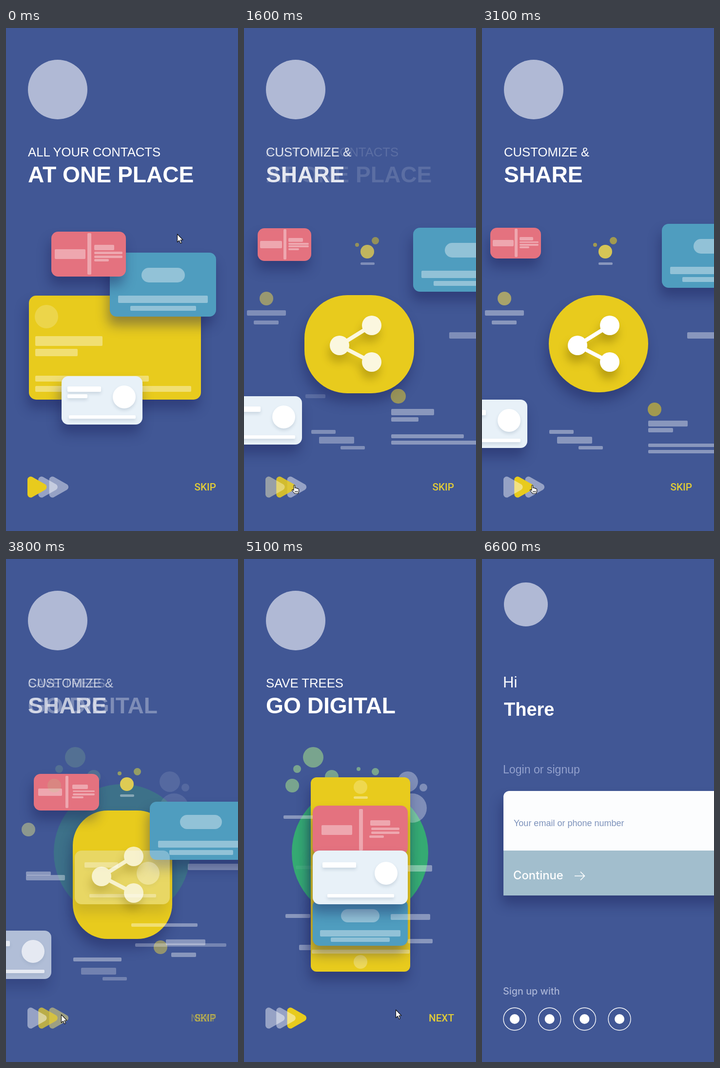
Write an HTML page that moves like this. It is 476x1030 px and loops after 6700 ms.

```html
<!DOCTYPE html>
<html lang="en">
<head>
<meta charset="utf-8">
<title>Onboarding</title>
<style>
  html, body { margin: 0; width: 100%; height: 100%; overflow: hidden; background: #415795; }
  body { position: relative; }
  body > * { position: absolute; }
  svg { left: 0; top: 0; width: 476px; height: 1030px; overflow: hidden; }
  text { font-family: "Liberation Sans", Arial, sans-serif; fill: #fff; }
  .lead { font-size: 25.7px; }
  .head { font-size: 46.2px; font-weight: 700; }
  .link { font: 500 20.7px Roboto, sans-serif; fill: #e3cd36; text-anchor: end; }
  .inter { font-family: Inter, sans-serif; font-weight: 500; }
  .dim { fill: #93a1cd; }
</style>
</head>
<body>
<script>
const LOOP = 6700, MOVE = 600;
const STARTS = [1157, 3564, 5920];
const SCENES = [0, 1, 2, 3];
const timing = { duration: LOOP, iterations: Infinity };

const veil = a => `rgba(255,255,255,${a})`;
const YELLOW = '#e8cb1d', RED = '#e4727f', BLUE = '#4f9dbf', PALE = '#e8f1f8';
const BAR = veil(.38), MOSS = 'rgba(232,203,29,.58)', GREEN = 'rgba(166,224,138,.56)';
const SHADOW = '-4px 18px 24px rgba(22,28,82,.4)';
const SOFT = '0 4px 6px rgba(70,100,130,.18)';

// Four scene poses become holds joined by eased moves.
function play(el, poses) {
  const frames = [{ ...poses[0], offset: 0 }];
  STARTS.forEach((start, i) => frames.push(
    { ...poses[i], offset: start / LOOP, easing: 'ease-in-out' },
    { ...poses[i + 1], offset: (start + MOVE) / LOOP }));
  frames.push({ ...poses[3], offset: 1 });
  el.animate(frames, timing);
}

const perScene = (value, i) => Array.isArray(value) ? value[Math.min(i, value.length - 1)] : value;

// A scene without a rectangle borrows the nearest one and fades out.
function box(color, rects, radius = 2, shadow = 'none') {
  const el = document.body.appendChild(document.createElement('div'));
  el.style.boxShadow = shadow;
  let last = rects.find(Boolean);
  play(el, SCENES.map(i => {
    last = rects[i] || last;
    const [left, top, width, height] = last.map(v => v + 'px');
    return {
      left, top, width, height, opacity: rects[i] ? 1 : 0,
      borderRadius: perScene(radius, i) + 'px', backgroundColor: perScene(color, i)
    };
  }));
}
const disc = (x, y, r) => [x - r, y - r, 2 * r, 2 * r];
const dot = (color, discs) => box(color, discs.map(d => d && disc(...d)), 200);

// Parts are [dx, dy, w, h] around the card centre; they spread with the card but never grow.
function card(color, [baseW, baseH], rects, parts, partColor, partShadow) {
  box(color, rects, 14, SHADOW);
  for (const [dx, dy, w, h] of parts) {
    const round = Math.min(w, h) > 25;
    box(partColor, rects.map(([x, y, cardW, cardH]) => {
      const kx = cardW / baseW, ky = cardH / baseH, size = Math.min(1, kx);
      return [x + cardW / 2 + dx * kx - w * size / 2, y + cardH / 2 + dy * ky - h * size / 2, w * size, h * size];
    }), round ? 24 : 2, partShadow);
  }
}

function layer(markup, opacities) {
  document.body.insertAdjacentHTML('beforeend', `<svg viewBox="0 0 476 1030">${markup}</svg>`);
  const el = document.body.lastElementChild;
  if (opacities) play(el, opacities.map(opacity => ({ opacity })));
  return el;
}
const shownIn = scene => SCENES.map(i => +(i === scene));

// Brand spot
dot('#b0b9d5', [...Array(3).fill([106, 126, 61]), [89.5, 93, 45]]);

// Scenery behind the phone
dot('#35aa73', [, , [238, 601, 140]]);
for (const d of [[142, 406, 21], [109, 430, 8], [180, 446, 14]]) dot(GREEN, [, , d]);
for (const d of [[336, 456, 21], [368, 468, 8], [345, 510, 30]]) dot(veil(.33), [, , d]);
dot([MOSS, MOSS, GREEN], [, [269, 435, 7.5], [269, 435, 7.5]]);
dot([MOSS, MOSS, GREEN], [, [232, 444, 4], [235, 430, 4]]);

// Loose bars keep their size while they drift
const drift = (w, h, from, to) => box(BAR, [, [...from, w, h], to && [...to, w, h]]);
drift(80, 11, [6, 578], [113, 790]);
drift(51, 8, [20, 599], [85, 727]);
drift(72, 14, [154, 837]);
drift(50, 7, [198, 856]);

// Large card, share button, phone body
box(YELLOW, [[47, 548, 353, 213], [137, 547, 204, 199], [137, 447, 204, 398]], [15, 100, 12], SHADOW);

// Its contents shrink into a cluster, then scatter at that size
const SHRINK = .585;
function scatter(color, [x, y, w, h], to, radius) {
  const small = [w * SHRINK, h * SHRINK];
  box(color, [[x, y, w, h], [341 + (x - 60) * SHRINK, 804 + (y - 631) * SHRINK, ...small], [...to, ...small]], radius);
}
scatter([veil(.2), MOSS, veil(.28)], disc(83, 591, 24), [225, 811], 24);
scatter(BAR, [60, 657, 87, 15], [336, 778]);
scatter(BAR, [60, 712, 233, 12], [81, 525]);
scatter([BAR, BAR, veil(.06)], [60, 733, 320, 12], [106, 628]);

drift(112, 13, [421, 623], [274, 627]);
box(BAR, [, [138, 823, 50, 8], [139, 800, 201, 8]]);
dot(['#d6c556', '#d6c556', '#efd84f'], [, [253, 458, 14], [239, 467, 14]]);
drift(29, 5, [239, 480], [225, 486]);

card(BLUE, [218, 131], [[213, 460, 218, 131], [369, 401, 218, 131], [141, 697, 195, 95]],
  [[0, -19.5, 89, 30], [0, 30, 184, 15], [0, 48.5, 135, 10]], BAR);
scatter(BAR, [60, 631, 138, 20], [301, 727]);

const textRows = [58, 58, 30].map((w, i) => [11.5 + w / 2, -2.5 + 7.5 * i, w, 5]);
card(RED, [153, 92], [[93, 417, 153, 92], [17, 409, 104, 63], [141, 505, 195, 100]],
  [[-38, 0, 63, 20], [1.5, -.5, 8, 85], [32, -13.5, 41, 11], ...textRows], BAR);
dot(GREEN, [, , [99, 464, 14]]);
box(['#a8a36b', '#a8a36b', '#c4e4d0'], [, disc(46, 554, 14)], 40);

// White cards
const idParts = [[-36.5, -23, 69, 11], [45, -7.5, 47, 47], [.5, 34, 137, 7]];
card(PALE, [166, 99], [[114, 713, 166, 99], [-73, 761, 166, 99]], idParts, '#fff', SOFT);
box('#fff', [[126, 750, 41, 8]], 2, SOFT);
card(PALE, [166, 99], [, , [141, 597, 195, 110]], idParts, '#fff', SOFT);

// Share symbol
const nodes = [[262, 609], [196, 650], [262, 684]];
layer(`<g fill="#fff" style="filter:drop-shadow(-3px 15px 9px rgba(110,90,0,.4))">
  <polyline points="${nodes}" fill="none" stroke="#fff" stroke-width="8"/>
  ${nodes.map(([x, y]) => `<circle cx="${x}" cy="${y}" r="20"/>`).join('')}</g>`, shownIn(1));

// Titles
[['ALL YOUR CONTACTS', 'AT ONE PLACE'], ['CUSTOMIZE &amp;', 'SHARE'], ['SAVE TREES', 'GO DIGITAL']]
  .forEach(([lead, head], scene) => layer(
    `<text x="45" y="263" class="lead">${lead}</text><text x="45" y="316" class="head">${head}</text>`,
    shownIn(scene)));

// Page indicator
const wedge = (i, color, opacity) => `<path d="M6.500 7V37L33 22Z" transform="translate(${44 + 22.3 * i} 918)"
  fill="${color}" stroke="${color}" stroke-width="13" stroke-linejoin="round" opacity="${opacity}"/>`;
for (const i of [2, 1, 0]) {
  layer(wedge(i, '#fff', .45), SCENES.map(scene => +(scene < 3 && scene !== i)));
  layer(wedge(i, YELLOW, 1), shownIn(i));
}
const link = label => `<text x="431" y="947" class="link">${label}</text>`;
layer(link('SKIP'), [1, 1, 0, 0]);
layer(link('NEXT'), shownIn(2));

// Login
box('#fcfdfe', [, , , [44, 475, 460, 214]], 12, SHADOW);
box('#a2becd', [, , , [44, 597, 460, 92]], 0);
const buttons = SCENES.map(i => {
  const at = `cx="${67 + 71.7 * i}" cy="942"`;
  return `<circle ${at} r="23" fill="none" stroke="#fff" stroke-width="1.4"/><circle ${at} r="10" fill="#fff"/>`;
}).join('');
layer(`<text x="43" y="263" font-size="31">Hi</text>
  <text x="45" y="321" font-size="38" font-weight="700">There</text>
  <text x="43" y="439" font-size="23.1" class="dim">Login or signup</text>
  <text x="65" y="547" font-size="18" style="fill:#7d92bb">Your email or phone number</text>
  <text x="64" y="656" font-size="23.8" class="inter">Continue</text>
  <path d="M190 649H210M202 640.500L210.500 649L202 657.500" fill="none" stroke="#fff" stroke-width="1.6"/>
  <text x="43" y="892" font-size="19.8" class="inter" style="fill:#a9b4d6">Sign up with</text>${buttons}`, shownIn(3));

// Pointer: [time, x, y], resting between trips
const TRIPS = [[100, 351, 422], [750, 89, 927], [1300, 89, 927], [1500, 98, 935], [3600, 98, 935],
  [3780, 113, 933], [4500, 113, 933], [5100, 311, 923], [5450, 398, 934]];
const path = [[0, ...TRIPS[0].slice(1)], ...TRIPS, [LOOP, ...TRIPS.at(-1).slice(1)]];
function pointer(shape, steps) {
  const el = layer(`<g fill="#fff" stroke="#111" stroke-width="1.1" stroke-linejoin="round">${shape}</g>`);
  el.firstChild.animate(path.map(([t, x, y]) => (
    { offset: t / LOOP, transform: `translate(${x}px,${y}px)`, easing: 'ease-in-out' })), timing);
  el.animate([...steps, [LOOP, 0]].map(([t, opacity]) => (
    { offset: t / LOOP, opacity, easing: 'step-end' })), timing);
}
pointer('<path d="M.5 0V16.500L4.300 13L7 19L9.500 18L7 12H12Z"/>', [[0, 1], [1500, 0], [3600, 1], [6400, 0]]);
pointer(`<path d="M4 12V2.500Q4 1 5.300 1Q6.500 1 6.500 2.500V7Q9 5.800 9.300 7.600Q11.500 6.600 12 8.500
  Q14.500 8 14.500 10V14L13 18.500H6L1 12.500Q0 10.500 1.800 10.300Z"/><path d="M7 13V16M9.300 13V16M11.500 13V16"/>`,
  [[0, 0], [1500, 1], [3600, 0]]);
</script>
</body>
</html>
```
